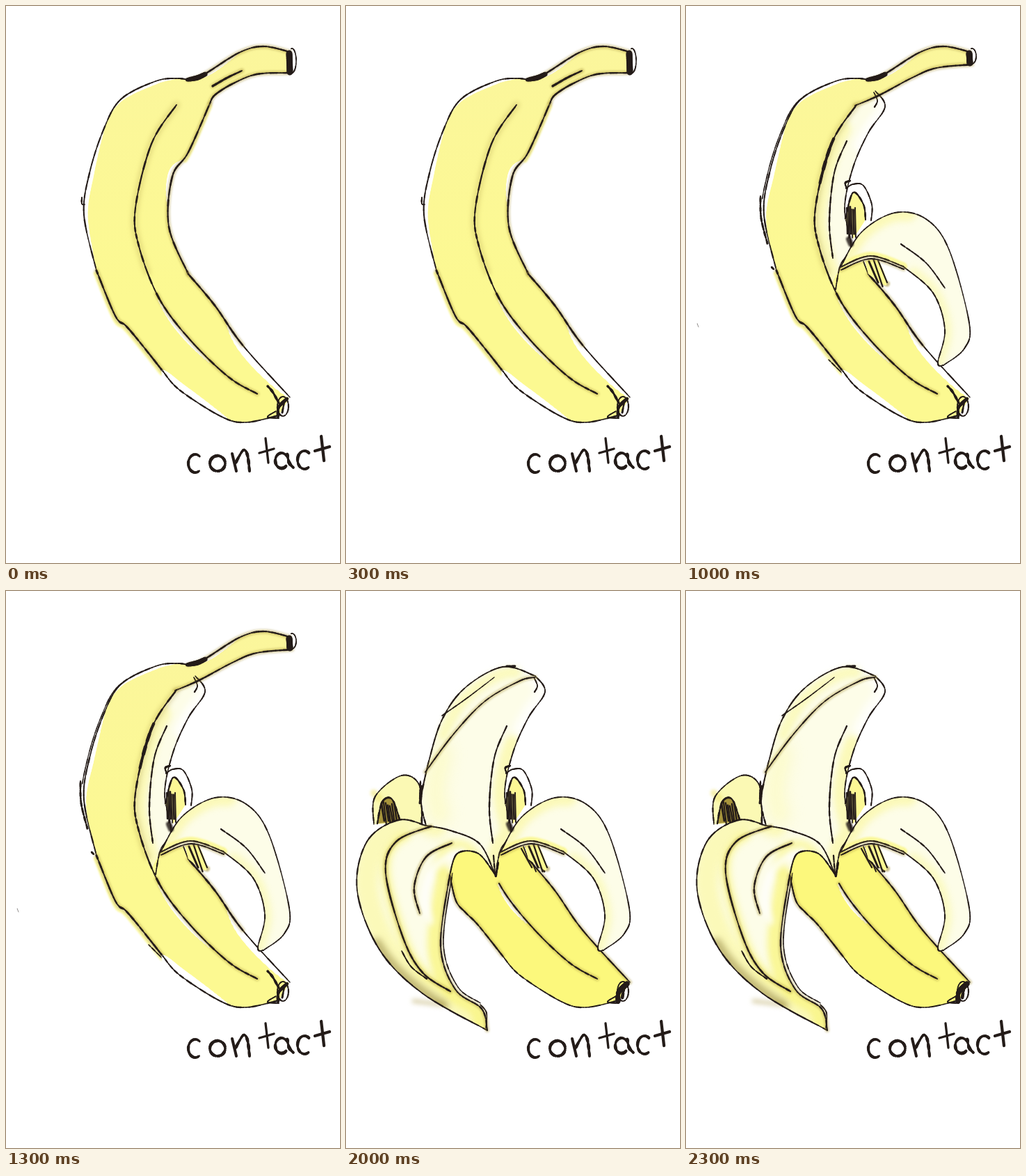
These frames come from a looping animation (480x800 px, 2500 ms). An HTML page with a canvas:

```html
<!DOCTYPE html>
<html lang="en">
<head>
<meta charset="utf-8">
<title>contact</title>
<style>
  html, body { margin: 0; width: 100%; height: 100%; overflow: hidden; background: #fff; }
  canvas { display: block; }
</style>
</head>
<body>
<canvas id="stage" width="480" height="800" role="img" aria-label="A banana being peeled, lettered: contact"></canvas>
<script>
const ctx = document.getElementById('stage').getContext('2d');
ctx.lineCap = ctx.lineJoin = 'round';
const INK = '#241c19', BRIGHT = '#fcf87c', PALE = '#fbf9b4', CREAM = '#fdfde8', OLIVE = '#a8953c';
const YELLOW = ctx.createLinearGradient(0, 60, 0, 420);
YELLOW.addColorStop(0, '#fbf69c');
YELLOW.addColorStop(1, '#fcf991');

// Samples a smooth curve through key points written as "x,y x,y ..."
function curve(text) {
  const keys = text.split(' ').map(s => s.split(',').map(Number));
  const at = i => keys[Math.max(0, Math.min(keys.length - 1, i))];
  const points = [at(0)];
  for (let i = 0; i < keys.length - 1; i++) {
    for (let t = 0.1; t < 1.05; t += 0.1) {
      points.push([0, 1].map(k => {
        const [a, b, c, d] = [at(i - 1)[k], at(i)[k], at(i + 1)[k], at(i + 2)[k]];
        return b + t / 2 * (c - a + t * (2 * a - 5 * b + 4 * c - d + t * (3 * (b - c) + d - a)));
      }));
    }
  }
  return points;
}

const arc = (x, y, rx, ry, from, to) => Array.from({ length: 25 }, (_, i) => {
  const a = from + (to - from) * i / 24;
  return [x + rx * Math.cos(a), y + ry * Math.sin(a)];
});
const part = (points, from, to) => points.slice(Math.floor(from * points.length), Math.ceil(to * points.length));
const flip = points => [...points].reverse();
const shift = (points, dx, dy) => points.map(([x, y]) => [x + dx, y + dy]);

function pathOf(points) {
  const path = new Path2D();
  points.forEach(p => path.lineTo(...p));
  return path;
}

function wash(color, ...edges) {
  ctx.save();
  ctx.filter = 'blur(0.6px)';
  ctx.fillStyle = color;
  ctx.fill(pathOf(edges.flat()));
  ctx.restore();
}

// Soft brush stroke, kept inside the given shape if there is one
function brush(color, points, width, blur = 3, alpha = 0.8, inside) {
  ctx.save();
  if (inside) ctx.clip(pathOf(inside.flat()));
  ctx.filter = `blur(${blur}px)`;
  ctx.globalAlpha = alpha;
  ctx.strokeStyle = color;
  ctx.lineWidth = width;
  ctx.stroke(pathOf(points));
  ctx.restore();
}

function segments(color, points, widthAt) {
  ctx.strokeStyle = color;
  for (let i = 1; i < points.length; i++) {
    ctx.lineWidth = widthAt(...points[i], i / points.length);
    ctx.stroke(pathOf([points[i - 1], points[i]]));
  }
}

// Pen line whose weight wavers with its position
function ink(points, width = 1.8) {
  segments(INK, points, (x, y) => width * (1 + 0.18 * Math.sin(x * 0.31 + y * 0.47) + 0.12 * Math.sin(x * 1.3 - y * 0.9)));
}

function wetInk(points, width = 2.2) {
  brush(OLIVE, points, width + 4, 1.5, 0.45);
  ink(points, width);
}

// Unpainted paper along an outline, fading at both ends
function gap(points, width) {
  segments('#fff', points, (x, y, t) => width * Math.sin(Math.PI * t) + 0.1);
}

function hatch(x, y, width, height, lean, count) {
  for (let i = 0; i < count; i++) {
    const left = x + width * i / (count - 1);
    ink([[left, y + 3 * Math.sin(i * 5)], [left + lean, y + height - 3 * Math.cos(i * 3)]], 2.4);
  }
}

const back = curve('262,106 245,104 215,108 165,134 140,178 120,240 112,300 130,380');
const belly = curve('130,380 157,445 172,459 190,480 225,524');
const under = curve('225,524 250,552 310,590 345,598 392,588');
const edge = curve('408,562 340,487 300,430 262,385');
const waist = curve('262,385 234,317 239,245 262,210 293,140');
const stemLow = curve('293,140 300,128 325,112 360,98 405,96');
const stemThin = curve('243,143 278,128 325,103 360,89 411,84');
const stemTop = curve('408,66 370,58 335,67 285,98 262,106');
const seam = curve('245,142 209,198 186,290 191,345 220,420 265,480 320,533 361,557');
const loin = curve('149,408 158,445 172,462 190,480 225,524');
const fork = [[255, 367], [222, 375], [214, 407]];

const fruitRight = curve('272,122 286,145 262,182 240,232 228,290 237,345 222,372 215,407');
const fruitLeft = curve('115,337 108,300 118,248');
const fruitCore = curve('231,194 213,240 206,310 211,362');
const crown = curve('118,248 137,187 170,140 225,109 272,122');
const crownSeam = curve('114,260 155,205 200,158 250,129 272,124');
const capTop = curve('119,250 140,178 165,134 215,108 262,106 299,83 300,103');
const capLow = curve('300,103 255,124 200,158 145,220 122,255');

const flapTop = curve('222,375 252,325 300,297 345,306 378,350 407,455 400,492 370,516');
const flapLow = curve('370,516 362,512 372,465 355,412 312,374');
const flapLip = curve('312,374 265,359 222,375');
const peelOut = curve('115,337 75,329 30,360 16,430 48,515 110,578 203,631');
const peelIn = curve('203,631 195,600 157,572 136,510 149,408');
const peelMouth = curve('149,408 160,377 190,377 214,407');
const peelRidge = curve('214,407 192,363 150,344 115,337');
const peelVein = curve('122,338 72,360 57,405 82,498 110,548 150,575');
const shortVein = curve('152,362 115,382 98,425 106,463');

function tail() {
  gap(part(edge, 0, 0.5), 20);
  gap(part(under, 0, 0.55), 20);
  gap(shift(part(seam, 0.57, 0.78), -1, 3), 7);
  ink(part(edge, 0, 0.4));
  wetInk(part(edge, 0.35, 1), 2.4);
  ink(under, 2);
  wetInk(part(seam, 0.56, 1));
  ink(curve('376,546 383,554 392,570'), 3.5);
  tip(2.5);
}

function tip(width) {
  ink(arc(398, 575, 8, 14, -1, 5.5), 2);
  ink(curve('404,564 392,576 391,589'), width * 1.6);
  ink(curve('400,568 397,584'), width);
  ink(curve('388,582 376,590 392,592'), 2);
}

function stem(low, lowEnd) {
  wetInk(low);
  wetInk(stemTop);
  ink(curve('260,106 275,103 286,98'), 6);
  segments(INK, curve(`407,68 408,${lowEnd}`), () => 9);
  ink(arc(411, (62 + lowEnd) / 2, 6, (lowEnd - 60) / 2, -1.8, 1.6), 1.6);
}

function wholeBanana() {
  wash(YELLOW, back, belly, under, edge, waist, stemLow, stemTop);
  gap(part(back, 0.15, 0.5), 9);
  gap(part(back, 0.55, 0.97), 14);
  gap(part(waist, 0.35, 0.68), 14);
  gap(part(stemTop, 0.5, 0.85), 10);
  brush(YELLOW, shift(part(waist, 0.7, 1), 1, 4), 5, 1);
  ink(back, 1.9);
  ink(curve('109,275 109,284 113,285'));
  brush(YELLOW, shift(belly, -2, 4), 5, 1);
  wetInk(belly, 2.4);
  wetInk(waist, 2.3);
  stem(stemLow, 95);
  wetInk(curve('297,115 318,103 339,93'), 2.6);
  brush(OLIVE, part(seam, 0, 0.5), 10, 3, 0.25);
  ink(part(seam, 0, 0.58), 2.2);
  tail();
}

function fruitMarks() {
  ink(fruitRight, 1.8);
  ink(fruitCore, 2.1);
  ink(curve('270,124 275,136 271,145'));
}

function halfPeeled() {
  const fruit = [fruitRight, flip(part(seam, 0, 0.52))];
  wash(CREAM, ...fruit);
  brush(PALE, part(seam, 0.1, 0.5), 34, 4, 0.9, fruit);
  brush('#fff', part(fruitRight, 0, 0.35), 22, 5, 0.8, fruit);
  wash(YELLOW, back, belly, under, edge, fork.slice(0, 2), flip(part(seam, 0, 0.53)), stemThin, stemTop);
  gap(part(back, 0.15, 0.5), 9);
  gap(part(back, 0.55, 0.9), 14);
  gap(part(stemTop, 0.5, 0.85), 10);
  fruitMarks();
  ink(back, 1.9);
  ink(shift(part(back, 0.42, 0.8), -3, 2), 1.4);
  ink(curve('107,273 108,305 117,341'), 2.6);
  ink(curve('123,375 126,378'), 2.4);
  brush(YELLOW, shift(belly, -2, 4), 5, 1);
  wetInk(belly, 2.4);
  ink(curve('205,508 238,541'), 1.6);
  stem(stemThin, 82);
  brush(OLIVE, part(seam, 0, 0.5), 9, 3, 0.3);
  ink(part(seam, 0, 0.58), 2.3);
  ink(part(seam, 0.13, 0.23), 4);
  ink([fork[0], edge.at(-1)], 2.2);
  tail();
}

function rightFlap() {
  const flap = [flapTop, flapLow, flapLip];
  wash(CREAM, ...flap);
  brush(PALE, part(flapTop, 0, 0.35), 26, 5, 0.9, flap);
  brush(PALE, part(flapLow, 0.2, 0.9), 20, 5, 0.7, flap);
  brush(YELLOW, flapLip, 12, 1, 0.9, flap);
  ink([...flapTop, ...flapLow], 1.8);
  ink(flapLip, 2);
  wetInk(shift(flapLip, 1, 4), 1.8);
  ink(curve('309,342 345,369 372,405'), 1.9);
  brush(INK, curve('234,335 237,342'), 8, 1, 0.85);
}

function rearFlap() {
  const inner = curve('229,305 240,268 255,285 258,307');
  wash(YELLOW, inner, [[240, 335]]);
  ink(curve('230,262 240,256 255,258 267,285 266,308'));
  ink(curve('236,251 229,254 231,262'), 2.4);
  ink(inner, 2.2);
  hatch(231, 290, 12, 40, 1, 6);
  brush(OLIVE, curve('284,397 289,399'), 8, 1, 0.6);
  wash(YELLOW, curve('257,366 277,367 288,401 262,385'));
  hatch(263, 367, 13, 33, 13, 3);
}

function lowerBody(color) {
  wash(color, loin, under, edge, fork, flip(peelMouth));
  wetInk(part(loin, 0, 1), 2.1);
  ink([fork[0], edge.at(-1)], 2.2);
}

function fruit(top) {
  const shape = [top, fruitRight, peelRidge, fruitLeft];
  wash(CREAM, ...shape);
  brush(PALE, shift(fruitLeft, 20, -15), 30, 10, 0.5, shape);
  brush(PALE, part(fruitRight, 0.4, 1), 32, 4, 0.9, shape);
  brush('#fff', part(fruitRight, 0, 0.35), 26, 6, 0.8, shape);
  ink(fruitLeft, 2);
  ink(curve('107,273 106,305 109,280'), 2.2);
  fruitMarks();
}

function leftPeel() {
  const peel = [peelOut, peelIn, peelMouth, peelRidge];
  wash(CREAM, ...peel);
  brush(PALE, shift(peelOut, 14, 0), 34, 6, 0.9, peel);
  brush('#f9f584', part(peelVein, 0.15, 1), 14, 5, 0.7, peel);
  brush('#f9f584', shift(peelIn, -8, 0), 22, 4, 0.8, peel);
  brush('#f9f584', shift(peelMouth, -16, -8), 16, 5, 0.6, peel);
  brush('#fff', shift(shortVein, 15, 12), 10, 4, 0.8, peel);
  brush('#8b7d34', part(peelOut, 0.65, 0.88), 18, 5, 0.5, peel);
  brush(OLIVE, curve('98,589 138,594'), 7, 3, 0.35);
  ink(peelOut, 2);
  ink(peelRidge, 2);
  ink(peelMouth, 2);
  wetInk(peelIn, 2);
  ink(shift(part(peelIn, 0.3, 1), 4, -3), 1.5);
  ink(curve('201,628 202,606 193,594'), 1.5);
  wetInk(peelVein, 2.3);
  wetInk(shortVein, 2.1);
  ink(curve('80,517 94,540 116,557'));
  ink(curve('212,380 215,410 219,390'), 2);
}

function cap() {
  wash(YELLOW, capTop, capLow);
  gap(part(capTop, 0.42, 0.65), 8);
  ink(capTop, 2);
  ink(shift(part(capTop, 0, 0.4), -3, 3), 1.4);
  wetInk(capLow, 2);
  ink(curve('260,106 275,104 287,98'), 5);
}

function leftRearFlap() {
  const outer = curve('40,335 42,295 80,265 106,280 109,333');
  const mouth = curve('45,334 52,303 66,299 78,331');
  wash(PALE, outer);
  brush('#f0e679', curve('40,290 48,298'), 10, 2, 0.6);
  wash(OLIVE, mouth);
  ink(outer, 1.9);
  ink(part(outer, 0.75, 1), 2.4);
  ink(mouth, 2.4);
  hatch(51, 306, 18, 27, 4, 7);
}

function lettering() {
  const pen = points => ink(points, 3.8);
  const c = (x, y) => pen(arc(x, y, 10, 13, -0.9, -5.3));
  const t = (x, y) => {
    pen([[x - 1, y - 18], [x + 3, y + 17]]);
    pen([[x - 10, y + 3], [x + 11, y - 3]]);
  };
  c(272, 657);
  pen(arc(304, 657, 11, 11, 0, 2 * Math.PI));
  pen([[325, 643], [331, 668]]);
  pen(curve('330,656 341,638 347,645 350,668'));
  t(374, 639);
  pen(arc(396, 653, 9, 11, -0.7, -5.5));
  pen(curve('404,644 407,656 413,663'));
  c(429, 652);
  t(454, 636);
}

function openedPeel(front) {
  front();
  rearFlap();
  leftPeel();
  rightFlap();
}

const poses = [
  wholeBanana,
  () => { halfPeeled(); rightFlap(); },
  () => { halfPeeled(); rearFlap(); rightFlap(); ink([[16, 456], [18, 461]], 0.5); },
  () => openedPeel(() => {
    lowerBody(YELLOW);
    tail();
    fruit(flip(capLow));
    cap();
  }),
  () => openedPeel(() => {
    lowerBody(BRIGHT);
    gap(shift(part(seam, 0.57, 0.7), -1, 2), 8);
    ink(under, 1.8);
    wetInk(edge, 2);
    wetInk(part(seam, 0.57, 1), 2);
    tip(4);
    leftRearFlap();
    fruit(crown);
    brush(PALE, shift(part(crown, 0.2, 0.8), 8, 8), 16, 4);
    ink(crown, 2);
    ink(curve('231,108 243,108'), 3);
    wetInk(crownSeam, 1.8);
    ink(curve('138,179 175,153 213,124'), 1.5);
    hatch(252, 370, 18, 30, 15, 4);
  })
];

let shown = -1;
function tick() {
  const pose = Math.floor(performance.now() / 500) % poses.length;
  if (pose !== shown) {
    shown = pose;
    ctx.fillStyle = '#fff';
    ctx.fillRect(0, 0, 480, 800);
    poses[pose]();
    lettering();
  }
  requestAnimationFrame(tick);
}
tick();
</script>
</body>
</html>
```
